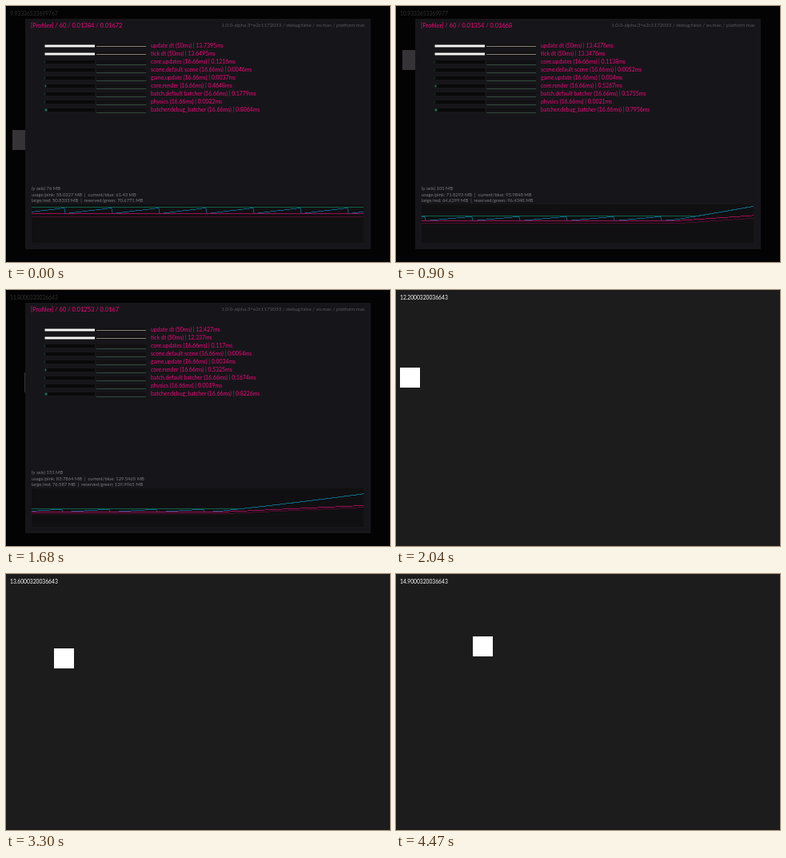
These frames come from a looping animation (480x320 px, 4500 ms). An HTML page with a canvas:

```html
<!DOCTYPE html>
<html>
<head>
<meta charset="utf-8">
<style>
html, body { margin: 0; width: 100%; height: 100%; overflow: hidden; background: #1c1c1c; }
canvas { display: block; width: 480px; height: 320px; }
</style>
</head>
<body>
<canvas id="stage" width="480" height="320"></canvas>
<script>
const ctx = document.getElementById('stage').getContext('2d');
const LOOP = 4500, STEP = 30, PANEL_END = 1890;
const SPEED = 1 / 9;            // square speed per axis, px per ms
const SCROLL = 0.1072;          // graph speed, px per ms
const PINK = '#f2057c';

// Times at which the square reverses along each axis
const turnsX = [441, 891, 1173, 1497, 1781, 2916, 3723];
const turnsY = [1076, 1836, 2180, 2790, 3344, 3636, 3924, 4149];
turnsX.splice(5, 0, 2040);

// label, typical milliseconds
const tasks = [
  ['core.updates', 0.11],
  ['scene.default scene', 0.0052],
  ['game.update', 0.0036],
  ['core.render', 0.48],
  ['batch.default batcher', 0.18],
  ['physics', 0.0021],
  ['batcher.debug_batcher', 0.88]
];

// Constant-speed path that reverses at every turn
function zigzag(start, direction, turns, t) {
  let position = start, from = 0;
  for (const turn of turns) {
    if (turn > t) break;
    position += direction * SPEED * (turn - from);
    direction = -direction;
    from = turn;
  }
  return Math.round(position + direction * SPEED * (t - from));
}

function random(seed) {
  const v = Math.sin(seed * 12.9898) * 43758.5453;
  return v - Math.floor(v);
}

const jitter = (t, seed, amount) => 1 + (random(seed + t / STEP * 17) - 0.5) * amount;
const short = (v, digits = 4) => String(+v.toFixed(digits));

function box(x, y, w, h, color) {
  ctx.fillStyle = color;
  ctx.fillRect(x, y, w, h);
}

function text(str, x, y, size, color, align = 'left') {
  ctx.font = `${size}px Lato, sans-serif`;
  ctx.textAlign = align;
  ctx.fillStyle = color;
  ctx.fillText(str, x, y);
}

// Memory in MB along the graph; s = 0 is where steady growth begins
const memory = {
  usage: s => 58.0327 + 0.143 * Math.max(0, s),
  large: s => memory.usage(s) - 7.1994,
  current: s => s >= 0 ? 61.43 + 0.335 * s + 0.00024 * s * s
    : 57.8 + 11.3 * ((((s + 19) % 59) + 59) % 59) / 59,
  reserved: s => Math.max(70.6771, memory.current(s) + 0.45)
};

function plot(value, now, axis, color) {
  ctx.beginPath();
  for (let x = 32; x <= 447; x++) {
    ctx.lineTo(x, Math.floor(296 - 48 * value(now + x - 447) / axis) + 0.5);
  }
  ctx.strokeStyle = color;
  ctx.lineWidth = 0.9;
  ctx.stroke();
}

function drawMemory(t) {
  const now = t * SCROLL;
  const axis = 76 + 25 * Math.max(0, Math.ceil((memory.reserved(now) - 76) / 25));
  const mb = name => short(memory[name](now)) + ' MB';
  const gray = '#7c7c7f';
  text(`(y axis) ${axis} MB`, 32, 230, 5.8, gray);
  text(`usage/pink: ${mb('usage')}  |  current/blue: ${mb('current')}`, 32, 237.5, 5.8, gray);
  text(`large/red: ${mb('large')}  |  reserved/green: ${mb('reserved')}`, 32, 244.7, 5.8, gray);
  box(32, 248, 415, 48, '#101012');
  plot(memory.large, now, axis, '#560c30');
  plot(memory.reserved, now, axis, '#0b6b50');
  plot(memory.current, now, axis, '#0c6a94');
  plot(memory.usage, now, axis, '#b00c5c');
}

function drawRow(index, label, budget, value, wide) {
  const y = 50 + index * 10;
  box(48, y - 2, 63, 4, '#090909');
  box(113, y - 2, 62, 4, '#111113');
  if (wide) box(48.5, y - 1.5, 62.5, 3, '#f4f4f2');
  else box(48.5, y - 1.5, Math.max(0.6, value / budget * 62), 3, '#1c6f58');
  box(113, wide ? y : y + 3, 62, 1, wide ? '#87836f' : '#2f4a3c');
  text(`${label} (${budget}ms) | ${short(value)}ms`, 181, y + 2.3, 6.9, PINK);
}

function drawPanel(t) {
  const update = 14 * jitter(t, 5, 0.4);
  box(24, 16, 432, 288, '#16161a');
  text(`[Profiler] / 60 / ${short(update / 1000 + 0.0001, 5)} / ${short(0.01669 * jitter(t, 37, 0.004), 5)}`,
    31, 26.5, 7.5, PINK);
  text('1.0.0-alpha.3+e2c1172033 / debug:false / os:mac / platform:mac', 449, 25.7, 6.27, '#57575c', 'right');
  drawRow(0, 'update dt', 50, update, true);
  drawRow(1, 'tick dt', 50, update - 0.09, true);
  tasks.forEach(([label, typical], i) =>
    drawRow(i + 2, label, 16.66, typical * jitter(t, i + 1, 0.25), false));
  drawMemory(t);
}

function draw(t) {
  const open = t < PANEL_END;
  const x = zigzag(8, 1, turnsX, t), y = zigzag(155, -1, turnsY, t);
  box(0, 0, 480, 320, open ? '#030303' : '#1c1c1c');
  box(x, y, 25, 25, open ? '#353335' : '#fff');
  const seconds = 9.93336533699767 + t / 900;
  text(String(+seconds.toPrecision(15)), 5, 12, 6.7, open ? '#333335' : '#fff');
  if (open) drawPanel(t);
}

function tick() {
  draw(Math.floor(performance.now() % LOOP / STEP) * STEP);
  requestAnimationFrame(tick);
}
tick();
</script>
</body>
</html>
```
